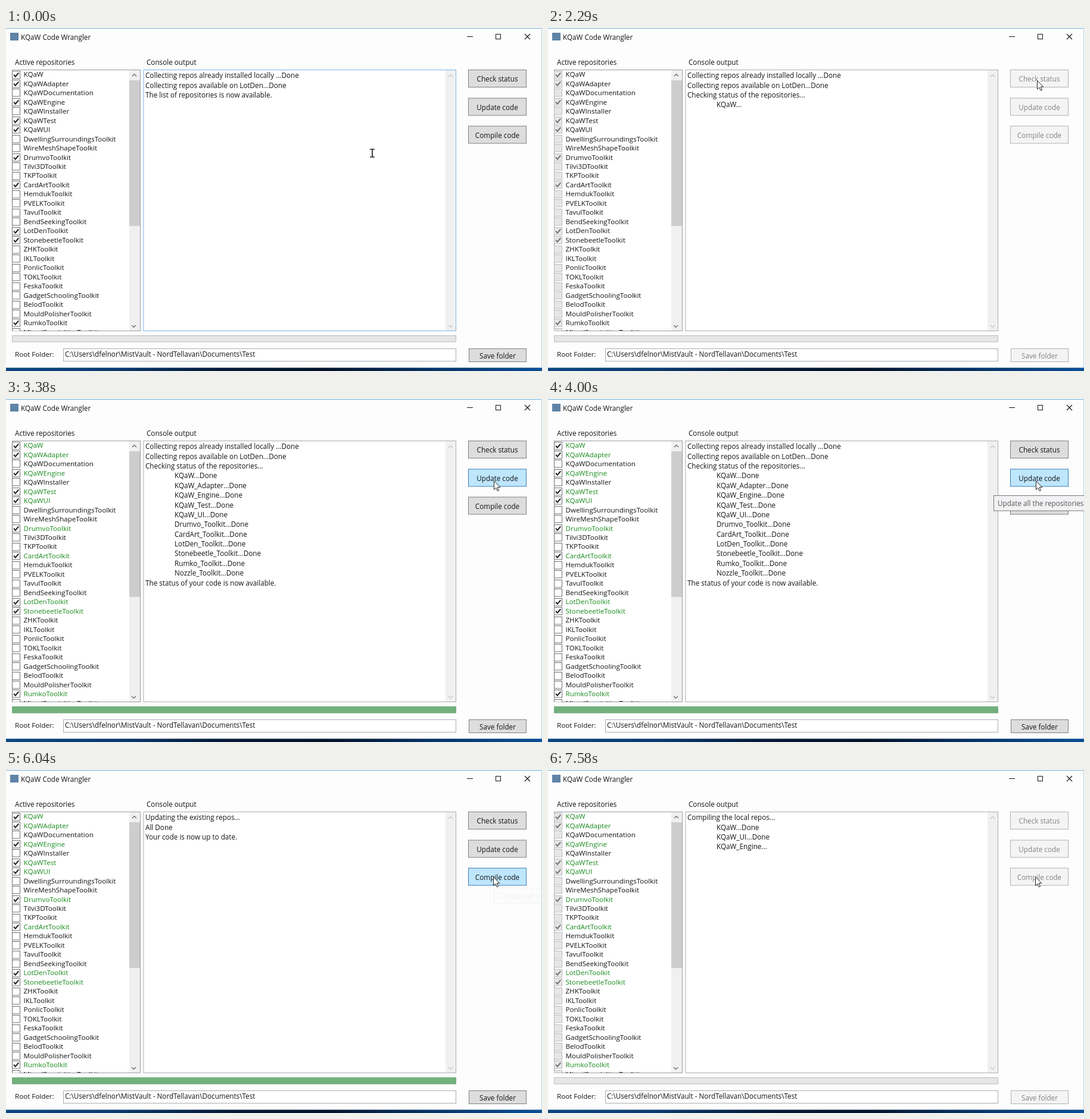
Write an HTML page with a canvas that moves like this. It is 900 px wide and 577 px high and loops after 8 s.

```html
<!DOCTYPE html>
<html lang="en">
<head>
<meta charset="utf-8">
<title>KQaW Code Wrangler</title>
<style>
html, body { margin: 0; width: 100%; height: 100%; overflow: hidden; background: #fdfdfd; }
canvas { display: block; }
</style>
</head>
<body>
<canvas id="stage" width="900" height="577"></canvas>
<script>
const ctx = document.getElementById('stage').getContext('2d');
const LOOP = 8000, GREEN = '#188a1c', INK = '#141414';

// A star marks a ticked repository.
const repos = ('*KQaW *KQaWAdapter KQaWDocumentation *KQaWEngine KQaWInstaller *KQaWTest *KQaWUI ' +
  'DwellingSurroundings+ WireMeshShape+ *Drumvo+ Tilvi3D+ TKP+ *CardArt+ Hemduk+ PVELK+ Tavul+ ' +
  'BendSeeking+ *LotDen+ *Stonebeetle+ ZHK+ IKL+ Ponlic+ TOKL+ Feska+ GadgetSchooling+ Belod+ ' +
  'MouldPolisher+ *Rumko+ MixedSpecialties+').replace(/\+/g, 'Toolkit').split(' ')
  .map(s => ({ name: s.replace('*', ''), on: s[0] === '*' }));
const active = [...repos.filter(r => r.on).map(r => r.name), 'NozzleToolkit'];
const folderName = s => s.replace(/(Adapter|Engine|Test|UI|Toolkit)$/, '_$1');

const buttons = [
  ['Check status', 776.5, 70.5, 97, 29],
  ['Update code', 776.5, 118, 97, 29],
  ['Compile code', 776.5, 165, 97, 29],
  ['Save folder', 777.5, 539.5, 96, 22]
];

const tips = [
  { x: 534.5, y: 105.5, text: 'Compare the current state of the LotDen repositories to what is online',
    keys: [[1060, .5], [1140, 1], [1300, .6], [1370, .25], [1450, 0]] },
  { x: 748.5, y: 162.5, text: 'Update all the repositories to the latest code',
    keys: [[3610, .15], [3690, .6], [3770, 1], [4080, .5], [4160, .2], [4250, 0]] },
  { x: 819.5, y: 198.5, text: 'Compile all your local repositories',
    keys: [[6040, .08], [6110, .5], [6190, 1], [6420, .6], [6500, .2], [6570, 0]] }
];

const lerp = (a, b, p) => a + (b - a) * p;
const smooth = p => p * p * (3 - 2 * p);
const valueAt = (keys, t, start) => keys.reduce((v, k) => t >= k[0] ? k[1] : v, start);

// Share of n equally spaced jumps that have happened between two times.
function jumps(t, from, to, n) {
  if (t < from) return 0;
  return Math.min(n, 1 + Math.floor((t - from) / (to - from) * (n - 1) + 1e-6)) / n;
}

function box(x, y, w, h, fill, line) {
  ctx.fillStyle = fill;
  ctx.fillRect(x, y, w, h);
  if (!line) return;
  ctx.strokeStyle = line;
  ctx.lineWidth = 1;
  ctx.strokeRect(x, y, w, h);
}

function path(points, color, width) {
  ctx.beginPath();
  points.forEach(([x, y]) => ctx.lineTo(x, y));
  ctx.strokeStyle = color;
  ctx.lineWidth = width;
  ctx.stroke();
}

function text(s, x, y, color = INK, size = 11.7, align = 'left') {
  ctx.font = size + 'px "Open Sans", "Noto Sans", sans-serif';
  ctx.textAlign = align;
  ctx.fillStyle = color;
  ctx.fillText(s, x, y);
}

const chevron = (x, y, dir, color) =>
  path([[x - 3.5, y + 2 * dir], [x, y - 1.5 * dir], [x + 3.5, y + 2 * dir]], color, 1.2);

function consoleLines(t, done) {
  const intro = ['Collecting repos already installed locally ...Done',
    'Collecting repos available on LotDen...Done'];
  const log = (names, n) => names.slice(0, n + 1)
    .map((s, i) => '\t' + folderName(s) + (i < n ? '...Done' : '...'));
  if (t < 1300) return [...intro, 'The list of repositories is now available.'];
  if (t < 4080) {
    const lines = [...intro, 'Checking status of the repositories...'];
    if (t >= 2290) lines.push(...log(active, done));
    if (t >= 3000) lines.push('The status of your code is now available.');
    return lines;
  }
  if (t < 5490) return ['Updating the existing repos...'];
  if (t < 6420) return ['Updating the existing repos...', 'All Done', 'Your code is now up to date.'];
  const lines = ['Compiling the local repos...'];
  if (t >= 6650) lines.push(...log(['KQaW', 'KQaWUI', 'KQaWEngine'], valueAt([[7200, 1], [7580, 2]], t, 0)));
  return lines;
}

function drawFrame() {
  box(0, 0, 900, 577, '#fdfdfd');
  box(0, 0, 900, 1, '#6fb1e0');
  box(899, 0, 1, 571, '#b9d3e6');
  const desk = ctx.createLinearGradient(0, 0, 900, 0);
  ['#0a4680', '#0a3a70', '#041a38', '#04142c', '#063468', '#0a4f96']
    .forEach((c, i) => desk.addColorStop(i / 5, c));
  box(0, 571.5, 900, 6, desk);

  box(7, 8, 14, 13, '#5f83a6');
  text('KQaW Code Wrangler', 25, 19.5);
  path([[774, 14.5], [784, 14.5]], INK, 1);
  ctx.strokeRect(822.5, 10.5, 8, 8);
  path([[871, 10], [880, 19]], INK, 1.1);
  path([[880, 10], [871, 19]], INK, 1.1);

  text('Active repositories', 15, 62);
  text('Console output', 236, 62);
  text('Root Folder:', 15, 553, INK, 11.6);
  box(96.5, 539.5, 659, 21, '#fff', '#abadb3');
  text('C:\\Users\\dfelnor\\MistVault - NordTellavan\\Documents\\Test', 99, 553);
}

function drawList(busy, done) {
  box(10.5, 70.5, 215, 439, '#fff', '#9a9ca2');
  ctx.save();
  ctx.beginPath();
  ctx.rect(9, 71, 216, 438.5);
  ctx.clip();
  const green = active.slice(0, done);
  repos.forEach(({ name, on }, i) => {
    const y = 78 + i * 15.48, top = Math.round(y - 6.5) + .5;
    box(10.5, top, 13, 12.5, busy ? '#e6e6e6' : '#fff', busy ? '#bcbcbc' : '#707070');
    if (on) path([[13, top + 6.2], [15.8, top + 9.3], [21.2, top + 2.8]], busy ? '#707070' : '#1a1a1a', 2);
    text(name, 29.5, y + 4.2, green.includes(name) ? GREEN : INK, 11.6);
  });
  box(207, 71, 18, 438, '#f0f0f0');
  box(207, 88, 18, 245, '#cdcdcd');
  chevron(215.5, 79, 1, '#606060');
  chevron(214.5, 502, -1, '#606060');
  ctx.restore();
}

function drawConsole(lines, hover) {
  box(231, 70.5, 524.5, 439, '#fff', hover ? '#7eb4ea' : '#abadb3');
  box(738, 71, 17, 438, '#f0f0f0');
  chevron(746.5, 80, 1, '#c4c4c4');
  chevron(746.5, 502, -1, '#c4c4c4');
  lines.forEach((s, i) => text(s.trim(), s[0] === '\t' ? 283 : 234, 84.2 + i * 16.39));
}

function drawButtons(busy, [cx, cy]) {
  buttons.forEach(([label, x, y, w, h]) => {
    const hover = cx > x && cx < x + w && cy > y && cy < y + h;
    const [fill, line] = busy ? ['#f4f4f4', '#adb2b5'] : hover ? ['#bee6fd', '#3c7fb1'] : ['#dddddd', '#808080'];
    box(x, y, w, h, fill, line);
    text(label, x + w / 2, y + h / 2 + 5, busy ? '#838383' : INK, 11.7, 'center');
  });
}

function drawTip({ x, y, text: s, keys }, t) {
  const alpha = valueAt(keys, t, 0);
  if (!alpha) return;
  ctx.globalAlpha = alpha;
  box(x, y, 500, 25.5, '#f2f2f4', '#767676');
  text(s, x + 6.5, y + 17.5, '#575757');
  ctx.globalAlpha = 1;
}

function drawCursor([x, y], beam) {
  if (beam) {
    path([[x, y - 6], [x, y + 6]], '#000', 1.5);
    for (const dy of [-6.5, 6.5]) path([[x - 4, y + dy], [x + 4, y + dy]], '#000', 1.3);
    return;
  }
  ctx.beginPath();
  [[0, 0], [0, 14.5], [3.4, 11.4], [5.8, 16.8], [8, 15.8], [5.7, 10.6], [10.2, 10.4]]
    .forEach(([dx, dy]) => ctx.lineTo(x + dx, y + dy));
  ctx.closePath();
  ctx.fillStyle = '#fff';
  ctx.fill();
  ctx.strokeStyle = '#222';
  ctx.lineWidth = 1;
  ctx.stroke();
}

function cursorAt(t) {
  const a = smooth(jumps(t, 130, 820, 10));
  const b = smooth(jumps(t, 3070, 3380, 5));
  const c = smooth(jumps(t, 5570, 5790, 4));
  return [lerp(615, 821.5, a) - 2 * b - c, lerp(210.5, 88.5, a) + 49.5 * b + 42 * c];
}

function draw(t) {
  const busy = t >= 1300 && t < 3000 || t >= 4080 && t < 5490 || t >= 6420;
  const done = valueAt([[2380, 3], [2460, 6], [3000, active.length]], t, 0);
  const fill = valueAt([[4080, 0], [5490, 1], [6420, 0]], t, done / active.length);
  const cursor = cursorAt(t), overConsole = cursor[0] < 738;

  drawFrame();
  drawList(busy, done);
  drawConsole(consoleLines(t, done), overConsole);
  box(10.5, 517.5, 745, 10.5, '#e6e6e6', '#bcbcbc');
  if (fill) box(10, 517, 746 * fill, 11.5, '#72b07d');
  drawButtons(busy, cursor);
  tips.forEach(tip => drawTip(tip, t));
  drawCursor(cursor, overConsole);
}

const start = performance.now();
function tick() {
  draw((performance.now() - start) % LOOP);
  requestAnimationFrame(tick);
}
tick();
</script>
</body>
</html>
```
